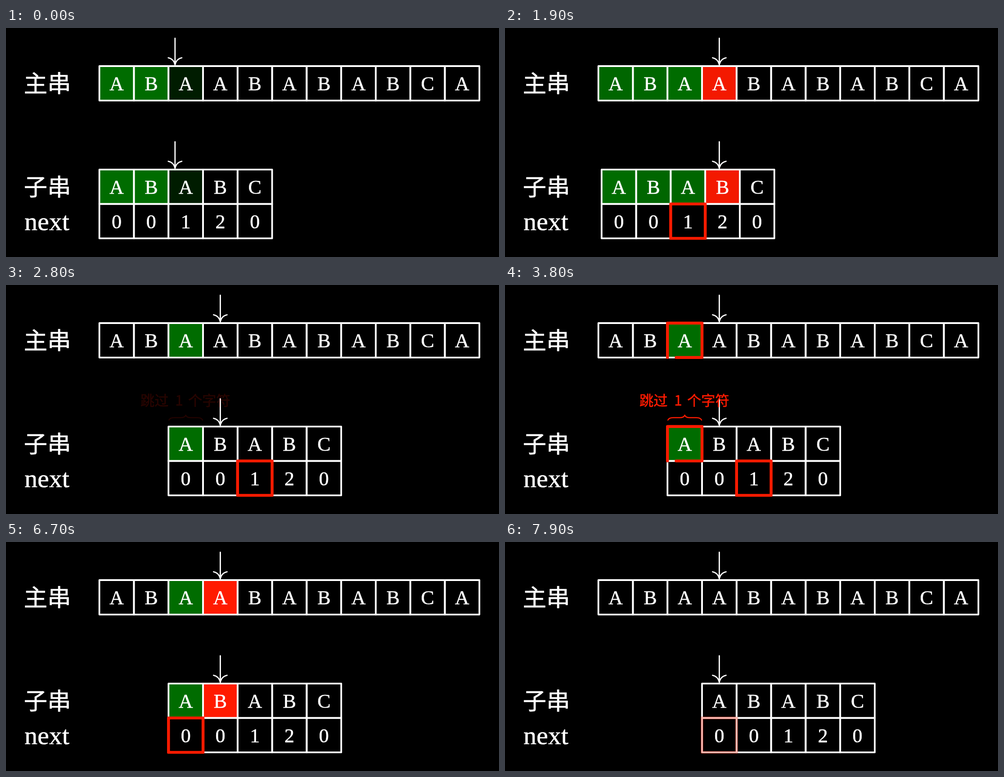
Animation of 1096x511 px, one loop 8 s. Source, as an HTML page with a canvas:

```html
<!DOCTYPE html>
<html lang="zh">
<head>
<meta charset="utf-8">
<style>
html, body { margin: 0; width: 100%; height: 100%; overflow: hidden; background: #000; }
canvas { display: block; }
</style>
</head>
<body>
<canvas id="stage" width="1096" height="511"></canvas>
<script>
const ctx = document.getElementById('stage').getContext('2d');
const LOOP = 8000;
const CELL = 76.8, LEFT = 207.6, MAIN_Y = 85, SUB_Y = 315.8;
const NEXT_Y = SUB_Y + CELL;
const GREEN = '#006c00', RED = '#ff1b00', WHITE = '#fff';
const SERIF = '"Liberation Serif", "Noto Serif", serif';
const SANS = '"Noto Sans CJK SC", "Noto Sans CJK", sans-serif';

const sigmoid = x => 1 / (1 + Math.exp(-x));
const EDGE = sigmoid(-5);

// Eased progress of a step between two times
function ease(t, from, to) {
  const p = Math.min(1, Math.max(0, (t - from) / (to - from)));
  const v = (sigmoid(10 * (p - 0.5)) - EDGE) / (1 - 2 * EDGE);
  return Math.min(1, Math.max(0, v));
}

const colX = i => LEFT + i * CELL;

// Text with a hairline edge for a slightly heavier weight
function text(str, x, y, size, family, align = 'left', color = WHITE) {
  ctx.font = `${size}px ${family}`;
  ctx.textAlign = align;
  ctx.fillStyle = ctx.strokeStyle = color;
  ctx.lineWidth = 0.6;
  ctx.lineJoin = 'round';
  ctx.fillText(str, x, y);
  ctx.strokeText(str, x, y);
}

function withAlpha(a, draw) {
  if (a <= 0) return;
  ctx.save();
  ctx.globalAlpha = a;
  draw();
  ctx.restore();
}

function fillCell(x, y, color, a) {
  withAlpha(a, () => {
    ctx.fillStyle = color;
    ctx.fillRect(x, y, CELL, CELL);
  });
}

function row(x, y, chars) {
  [...chars].forEach((c, i) => {
    ctx.strokeStyle = WHITE;
    ctx.lineWidth = 3.8;
    ctx.lineJoin = 'round';
    ctx.strokeRect(x + i * CELL, y, CELL, CELL);
    text(c, x + (i + 0.5) * CELL, y + 54, 44, SERIF, 'center');
  });
}

function arrow(x, tip) {
  ctx.strokeStyle = WHITE;
  ctx.lineWidth = 2.8;
  ctx.lineCap = 'round';
  ctx.lineJoin = 'round';
  ctx.beginPath();
  ctx.moveTo(x, tip - 59);
  ctx.lineTo(x, tip);
  ctx.moveTo(x - 15, tip - 15.5);
  ctx.quadraticCurveTo(x - 3, tip - 13, x, tip);
  ctx.quadraticCurveTo(x + 3, tip - 13, x + 15, tip - 15.5);
  ctx.stroke();
}

// Outline traced clockwise from the lower left corner
function outline(x, y, part, a = 1) {
  if (part <= 0) return;
  withAlpha(a, () => {
    const corners = [[0, 1], [0, 0], [1, 0], [1, 1], [0, 1]];
    ctx.strokeStyle = RED;
    ctx.lineWidth = 6.4;
    ctx.lineCap = 'round';
    ctx.lineJoin = 'round';
    ctx.beginPath();
    ctx.moveTo(x, y + CELL);
    for (let i = 0; i < 4; i++) {
      const k = Math.min(1, part * 4 - i);
      if (k <= 0) break;
      const [ax, ay] = corners[i], [bx, by] = corners[i + 1];
      ctx.lineTo(x + (ax + (bx - ax) * k) * CELL, y + (ay + (by - ay) * k) * CELL);
    }
    if (part >= 1) ctx.closePath();
    ctx.stroke();
  });
}

function brace(x, y) {
  const mid = x + CELL / 2;
  ctx.strokeStyle = RED;
  ctx.lineWidth = 2.4;
  ctx.lineCap = 'round';
  ctx.beginPath();
  for (const s of [-1, 1]) {
    ctx.moveTo(mid + s * 37.5, y);
    ctx.quadraticCurveTo(mid + s * 35, y - 5.5, mid + s * 26, y - 5.5);
    ctx.lineTo(mid + s * 11, y - 5.5);
    ctx.quadraticCurveTo(mid + s * 2, y - 5.5, mid, y - 11);
  }
  ctx.stroke();
}

function note() {
  brace(colX(2), 301.5);
  text('跳过', 299, 269, 31.2, SANS, 'left', RED);
  text('1', 385, 269, 31.2, SANS, 'center', RED);
  text('个字符', 405, 269, 31.2, SANS, 'left', RED);
}

function draw(t) {
  const jump = ease(t, 1690, 2690), slide = ease(t, 6690, 7550);
  const subX = colX(2 * jump + slide);
  const clear = 1 - ease(t, 4420, 5090);

  ctx.fillStyle = '#000';
  ctx.fillRect(0, 0, 1096, 511);

  const gone = 1 - jump, last = 1 - slide;
  const third = ease(t, -130, 200);
  const miss = ease(t, 380, 710) * gone;
  const missAgain = ease(t, 5200, 5540) * last;
  fillCell(colX(0), MAIN_Y, GREEN, gone);
  fillCell(colX(1), MAIN_Y, GREEN, gone);
  fillCell(colX(2), MAIN_Y, GREEN, third * last);
  fillCell(colX(3), MAIN_Y, RED, miss + missAgain);
  fillCell(subX, SUB_Y, GREEN, last);
  fillCell(subX + CELL, SUB_Y, GREEN, gone);
  fillCell(subX + CELL, SUB_Y, RED, missAgain);
  fillCell(subX + 2 * CELL, SUB_Y, GREEN, third * gone);
  fillCell(subX + 3 * CELL, SUB_Y, RED, miss);

  row(LEFT, MAIN_Y, 'ABAABABABCA');
  row(subX, SUB_Y, 'ABABC');
  row(subX, NEXT_Y, '00120');

  text('主串', 39.5, 142.5, 52.5, SANS);
  text('子串', 39.5, 373.5, 52.5, SANS);
  text('next', 41, 451, 58, SERIF);

  const pointer = colX(1.5 + ease(t, -190, 140) + ease(t, 250, 580));
  arrow(pointer, 82);
  arrow(pointer, 313);

  outline(subX + 2 * CELL, NEXT_Y, ease(t, 790, 1690), clear);
  const match = ease(t, 3040, 4040);
  outline(colX(2), MAIN_Y, match, clear);
  outline(colX(2), SUB_Y, match, clear);
  withAlpha(ease(t, 2690, 3040) * clear, note);
  outline(subX, NEXT_Y, ease(t, 5620, 6620), 1 - ease(t, 7550, 8150));
}

const start = performance.now();
function tick() {
  draw((performance.now() - start) % LOOP);
  requestAnimationFrame(tick);
}
tick();
</script>
</body>
</html>
```
